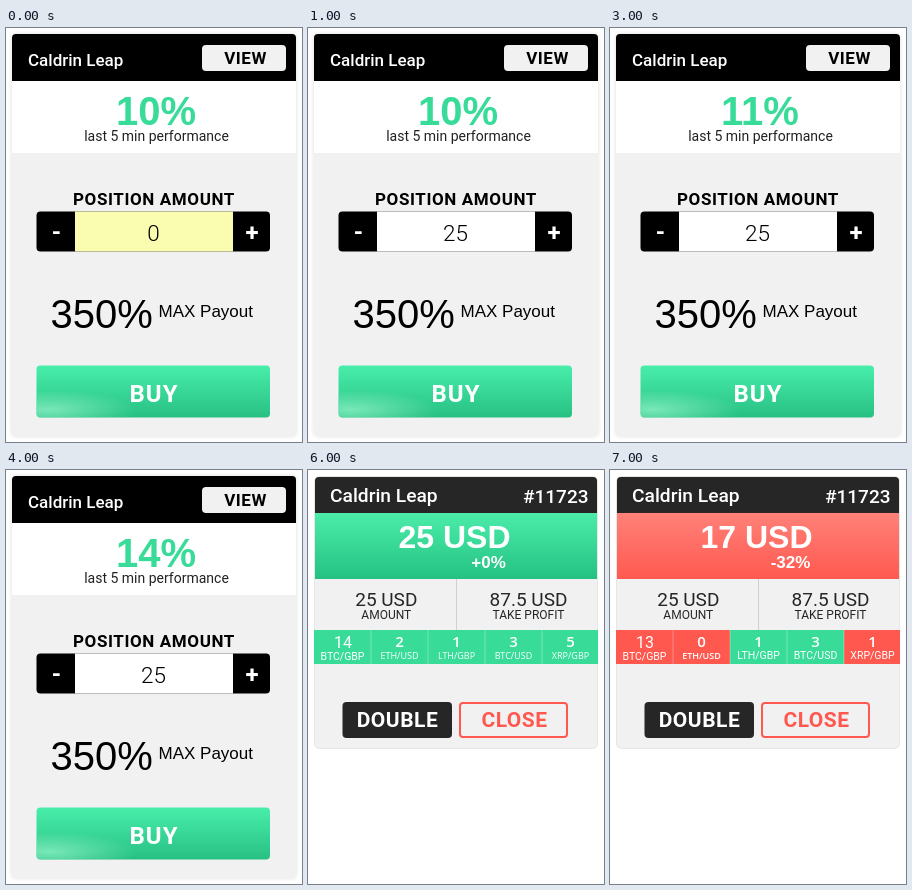
An HTML page for the animation above (8 s loop, 296 by 414 pixels).

```html
<!DOCTYPE html>
<html lang="en">
<head>
<meta charset="utf-8">
<style>
  html, body { margin: 0; width: 100%; height: 100%; overflow: hidden; background: #fff; }
  svg { display: block; width: 296px; height: 414px; }
  text { font-family: Roboto, sans-serif; }
  .arial { font-family: "Liberation Sans", Arial, sans-serif; }
  .open { font-family: "Open Sans", sans-serif; }
  .card { filter: drop-shadow(0 0 2px #0002); }
</style>
</head>
<body>
<svg id="stage" viewBox="0 0 296 414"></svg>
<script>
const STEP = 1000, STEPS = 8;
const GREEN = '#38dc98', RED = '#ff584f', GREY = '#f1f1f1', DARK = '#262626';
const stage = document.getElementById('stage');

const rect = (x, y, w, h, fill, extra = '') =>
  `<rect x="${x}" y="${y}" width="${w}" height="${h}" fill="${fill}" ${extra}/>`;

function text(str, x, y, size, { fill = '#000', weight = 400, anchor = 'middle', face = '', gap = 0 } = {}) {
  return `<text class="${face}" x="${x}" y="${y}" font-size="${size}" font-weight="${weight}" ` +
    `fill="${fill}" text-anchor="${anchor}" letter-spacing="${gap}">${str}</text>`;
}

const gradient = (id, top, bottom) =>
  `<linearGradient id="${id}" x2="0" y2="1"><stop stop-color="${top}"/>` +
  `<stop offset="1" stop-color="${bottom}"/></linearGradient>`;

const defs = '<defs>' +
  gradient('buy', '#49eeab', '#27c083') +
  gradient('pressed', '#00784a', '#0fa96a') +
  gradient('gain', '#4beda9', '#24c183') +
  gradient('loss', '#ff8179', '#ff594f') +
  '<radialGradient id="glow" cx=".05" cy=".85" r=".38"><stop stop-color="#8cf0c5" stop-opacity=".8"/>' +
  '<stop offset="1" stop-color="#8cf0c5" stop-opacity="0"/></radialGradient></defs>';

function orderScreen({ amount, change, pressed }) {
  const white = { fill: '#fff', weight: 700 };
  return rect(6, 6, 284, 402, GREY, 'rx="4" class="card"') +
    '<path d="M6 53V10a4 4 0 0 1 4-4H286a4 4 0 0 1 4 4V53Z"/>' +
    text('Caldrin Leap', 22, 38, 17, { fill: '#fff', weight: 500, anchor: 'start' }) +
    rect(196, 17, 84, 26, GREY, 'rx="4"') +
    text('VIEW', 239.5, 36, 17, { weight: 700, gap: .5 }) +
    rect(6, 53, 284, 72, '#fff') +
    text(change + '%', 150, 96.5, 40, { fill: change < 0 ? RED : GREEN, weight: 700, face: 'arial' }) +
    text('last 5 min performance', 150.5, 113, 14, { fill: '#222' }) +
    text('POSITION AMOUNT', 148, 177, 17, { weight: 700, gap: .6 }) +
    rect(30.5, 183.5, 233.5, 40, '#000', 'rx="4"') +
    rect(69, 183.5, 158, 40, amount ? '#fff' : '#fafdb0') +
    text('-', 50.3, 212, 24, white) +
    text('+', 246, 213, 24, white) +
    text(amount, 147.5, 212.5, 22.5, { weight: 300 }) +
    text('350%', 44.5, 299.5, 40, { anchor: 'start', face: 'arial' }) +
    text('MAX Payout', 152.5, 289, 17, { anchor: 'start', face: 'arial' }) +
    rect(30.5, 337.5, 233.5, 52, `url(#${pressed ? 'pressed' : 'buy'})`, 'rx="4"') +
    (pressed ? '' : rect(30.5, 337.5, 233.5, 52, 'url(#glow)', 'rx="4"')) +
    text('BUY', 148, 374, 24, { ...white, gap: 1 });
}

const pairs = ['BTC/GBP', 'ETH/USD', 'LTH/GBP', 'BTC/USD', 'XRP/GBP'];

function pairCell(count, i, loss) {
  const x = 6 + 57 * i, mid = x + 28.5;
  const red = loss && i !== 2 && i !== 3;
  const fill = '#fff';
  const wide = i === 0 || (loss && i > 1);
  return rect(x, 160, i < 4 ? 57 : 56, 34, red ? RED : GREEN) +
    (i ? rect(x - .5, 160, 1, 34, '#fff', 'opacity=".3"') : '') +
    (i ? text(count, mid, 177, 15, { fill, weight: 600, face: 'open' })
       : text(count, mid + .5, 178, 16, { fill })) +
    (wide ? text(pairs[i], mid, i ? 189 : 190, 10.5, { fill })
          : text(pairs[i], mid, 189, 9, { fill, weight: loss ? 600 : 500, face: 'open' }));
}

function positionScreen({ value, profit, counts, loss }) {
  const bold = { fill: '#fff', weight: 700, face: 'arial' };
  return rect(6.5, 6.5, 283, 272, GREY, 'rx="5" stroke="#e6e6e6"') +
    `<path d="M7 43V11a4 4 0 0 1 4-4H285a4 4 0 0 1 4 4V43Z" fill="${DARK}"/>` +
    text('Caldrin Leap', 22, 32, 19.2, { fill: '#fff', weight: 500, anchor: 'start' }) +
    text('#11723', 280.5, 33, 19, { fill: '#fff', weight: 500, anchor: 'end' }) +
    rect(7, 43, 282, 66, `url(#${loss ? 'loss' : 'gain'})`) +
    text(value + ' USD', 146.5, 78, 32, bold) +
    text(profit, 180.5, 98, 17, bold) +
    rect(148, 109, 1, 51, '#d0d0d0') +
    text('25 USD', 78.3, 136, 19, { fill: DARK }) +
    text('AMOUNT', 78.3, 149, 12, { fill: DARK }) +
    text('87.5 USD', 220.5, 136, 19, { fill: DARK }) +
    text('TAKE PROFIT', 220.5, 149, 12, { fill: DARK }) +
    counts.map((n, i) => pairCell(n, i, loss)).join('') +
    rect(34.5, 232, 109.5, 36, DARK, 'rx="4"') +
    text('DOUBLE', 89.5, 257, 21, { fill: '#fff', weight: 700, gap: .5 }) +
    rect(152, 233, 107, 34, 'none', `rx="3" stroke="${RED}" stroke-width="2"`) +
    text('CLOSE', 206.5, 257, 21, { fill: RED, weight: 700, gap: .5 });
}

const scenes = [
  orderScreen({ amount: 0, change: 10 }),
  orderScreen({ amount: 25, change: 10 }),
  orderScreen({ amount: 25, change: -9 }),
  orderScreen({ amount: 25, change: 11 }),
  orderScreen({ amount: 25, change: 14 }),
  orderScreen({ amount: 25, change: 14, pressed: true }),
  positionScreen({ value: 25, profit: '+0%', counts: [14, 2, 1, 3, 5] }),
  positionScreen({ value: 17, profit: '-32%', counts: [13, 0, 1, 3, 1], loss: true })
];

let shown = -1;
function draw() {
  const step = Math.floor(performance.now() / STEP) % STEPS;
  if (step !== shown) {
    shown = step;
    stage.innerHTML = defs + scenes[step];
  }
  requestAnimationFrame(draw);
}
draw();
</script>
</body>
</html>
```
